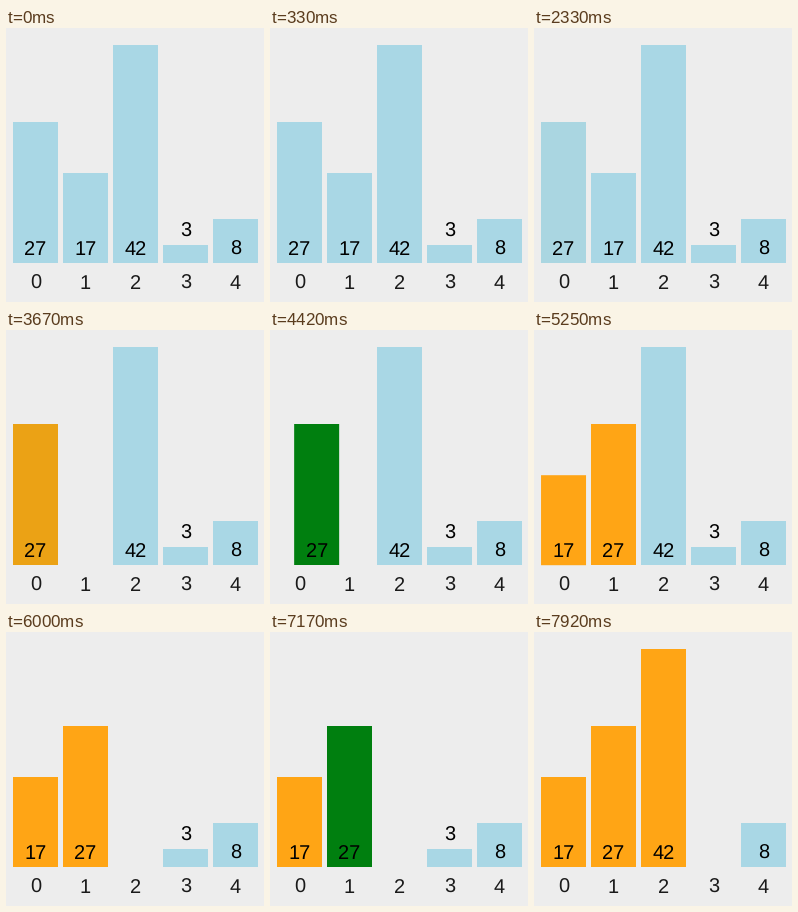
Recreate the animation shown at these times as a matplotlib script. Size 258x274 px, loop 8000 ms.

```python
import matplotlib.pyplot as plt
from matplotlib.animation import FuncAnimation
from matplotlib.colors import to_rgb
from matplotlib.patches import Rectangle
import numpy as np

WIDTH, HEIGHT, DPI = 258, 274, 64
FPS, LOOP_MS = 12, 8000
MOVE_MS = 260

BACKGROUND = "#ededed"
BLUE, ORANGE, GREEN, RED = "#a9d7e5", "#ffa515", "#007f0f", "#ff0000"

LEFT, PITCH, BAR_WIDTH, FLOOR = 7, 50, 45, 235
DROP = 270           # how far an extracted bar sinks
DIGIT_ADVANCE = 11.12
VALUES = [27, 17, 42, 3, 8]

# value: [(start ms, duration ms, slot, depth, colour)]
MOVES = {
    27: [(2208, MOVE_MS, 0, 0, ORANGE), (3597, MOVE_MS, 0, 0, GREEN),
         (4302, MOVE_MS, 1, 0, GREEN), (5005, MOVE_MS, 1, 0, ORANGE),
         (6435, MOVE_MS, 1, 0, GREEN), (7160, MOVE_MS, 1, 0, ORANGE)],
    17: [(2990, 1, 1, DROP, RED), (5005, MOVE_MS, 0, 0, ORANGE)],
    42: [(5720, MOVE_MS, 2, DROP, RED), (7160, MOVE_MS, 2, 0, ORANGE)],
    3: [(7773, MOVE_MS, 3, DROP, RED)],
}

plt.rcParams.update({
    "font.family": "Liberation Sans",
    "font.size": 20 * 72 / DPI,
    "text.hinting": "none",
    "toolbar": "None",
})


def ease(p):
    """Cubic in-out."""
    p = min(max(p, 0), 1)
    return 4 * p ** 3 if p < 0.5 else 1 - 4 * (1 - p) ** 3


def pack(slot, depth, colour):
    return np.array([slot, depth, *to_rgb(colour)])


def bar_state(value, ms):
    state = pack(VALUES.index(value), 0, BLUE)
    for start, duration, *goal in MOVES.get(value, []):
        state = state + (pack(*goal) - state) * ease((ms - start) / duration)
    return state


def text_left(text, slot):
    centre = LEFT + PITCH * slot + BAR_WIDTH / 2
    return centre - len(text) * DIGIT_ADVANCE / 2


class Bar:
    def __init__(self, value):
        self.value = value
        self.height = round(2.6 + 5.13 * value)
        self.rect = Rectangle((0, 0), BAR_WIDTH, self.height, lw=0, snap=False)
        ax.add_patch(self.rect)
        self.text = ax.text(0, 0, str(value), color="black", zorder=3)
        # short bars carry their number on top
        self.baseline = FLOOR - 8 if self.height > 20 else FLOOR - self.height - 8

    def update(self, ms):
        slot, depth, *colour = bar_state(self.value, ms)
        self.rect.set_xy((LEFT + PITCH * slot, FLOOR - self.height + depth))
        self.rect.set_facecolor(np.clip(colour, 0, 1))
        self.text.set_position((text_left(str(self.value), slot),
                                self.baseline + depth))
        self.text.set_visible(self.baseline + depth < HEIGHT + 20)


fig = plt.figure(figsize=(WIDTH / DPI, HEIGHT / DPI), dpi=DPI,
                 facecolor=BACKGROUND)
ax = fig.add_axes([0, 0, 1, 1])
ax.set(xlim=(0, WIDTH), ylim=(HEIGHT, 0))
ax.axis("off")

bars = [Bar(value) for value in VALUES]
for index in range(len(VALUES)):
    ax.text(text_left("0", index), 261, str(index), color="#1a1a1a", zorder=4)


def update(frame):
    for bar in bars:
        bar.update(frame * 1000 / FPS)
    return [artist for bar in bars for artist in (bar.rect, bar.text)]


animation = FuncAnimation(fig, update, frames=LOOP_MS * FPS // 1000,
                          interval=1000 / FPS, repeat=True, repeat_delay=0,
                          blit=False)
plt.show()
```
